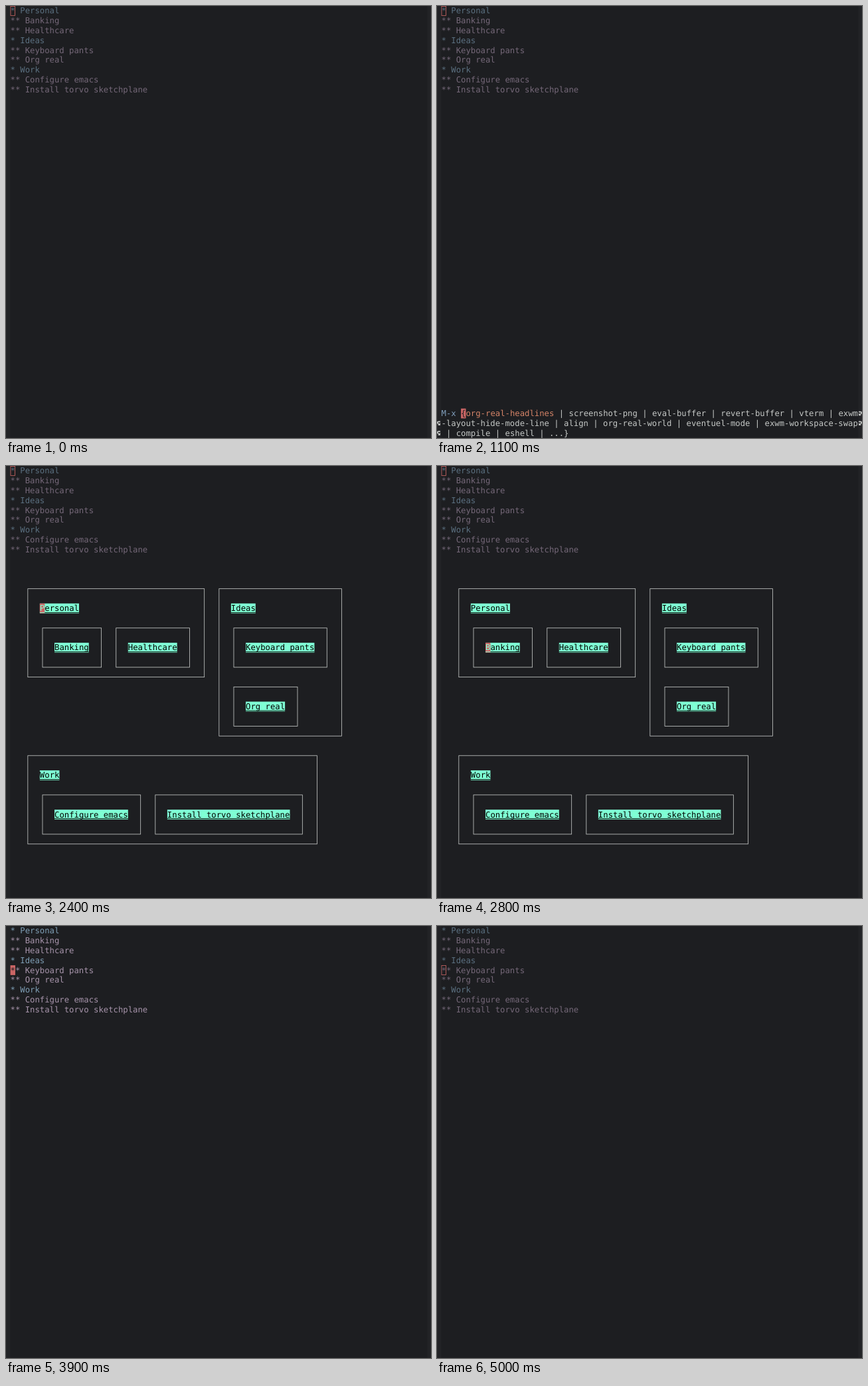
An HTML page for the animation above (5600 ms loop, 640 px wide and 650 px high).

```html
<!DOCTYPE html>
<html lang="en">
<head>
<meta charset="utf-8">
<title>Outline to boxes</title>
<style>
  html, body { margin: 0; width: 100%; height: 100%; overflow: hidden; background: #1d1e21; }
  svg { display: block; width: 100vw; height: 100vh; }
  text {
    font: 14.949px "DejaVu Sans Mono", monospace;
    text-rendering: geometricPrecision;
    white-space: pre;
    fill: #c5c8c6;
  }
  .fringe { fill: #222326; }
  .h1 { fill: #5b7080; }
  .h2 { fill: #756879; }
  .active .h1 { fill: #7f9fb6; }
  .active .h2 { fill: #a794ab; }
  .box { fill: none; stroke: #c5c8c6; }
  .label { fill: #7fffd4; }
  .ink { fill: #000; }
  .prompt { fill: #819fbd; }
  .pick { fill: #d58468; }
  .cursor { fill: #cc6666; }
  .hollow { fill: none; stroke: #cc6666; }
  .curl { fill: none; stroke: #c5c8c6; stroke-width: 2; }
  .tip { fill: #c5c8c6; }
</style>
</head>
<body>
<svg id="stage" viewBox="0 0 780 792" preserveAspectRatio="none"></svg>
<script>
const LOOP = 5600, CW = 9, RH = 18, LEFT = 8;
const BG = "#1d1e21", AQUA = "#7fffd4";
const stage = document.getElementById("stage");
const colX = c => LEFT + c * CW;

function add(parent, tag, attrs = {}, content = "") {
  const el = document.createElementNS("http://www.w3.org/2000/svg", tag);
  for (const key in attrs) el.setAttribute(key, attrs[key]);
  el.textContent = content;
  parent.appendChild(el);
  return el;
}

const rect = (parent, x, y, width, height, cls) =>
  add(parent, "rect", { x, y, width, height, class: cls });

const write = (parent, col, row, str, cls = "") =>
  add(parent, "text", { x: colX(col), y: row * RH + 14, class: cls }, str);

rect(stage, 0, 0, 780, 792, "").setAttribute("fill", BG);
rect(stage, 0, 0, 8, 792, "fringe");
rect(stage, 773, 0, 7, 792, "fringe");

// Outline
const outline = add(stage, "g");
[
  "* Personal", "** Banking", "** Healthcare",
  "* Ideas", "** Keyboard pants", "** Org real",
  "* Work", "** Configure emacs", "** Install torvo sketchplane"
].forEach((line, row) => write(outline, 0, row, line, line[1] === "*" ? "h2" : "h1"));

// Boxes: label, left column, right column, top row, bottom row
const boxes = add(stage, "g");
[
  ["Personal", 3, 39, 12, 21],
  ["Banking", 6, 18, 16, 20],
  ["Healthcare", 21, 36, 16, 20],
  ["Ideas", 42, 67, 12, 27],
  ["Keyboard pants", 45, 64, 16, 20],
  ["Org real", 45, 58, 22, 26],
  ["Work", 3, 62, 29, 38],
  ["Configure emacs", 6, 26, 33, 37],
  ["Install torvo sketchplane", 29, 59, 33, 37]
].forEach(([name, left, right, top, bottom]) => {
  rect(boxes, colX(left) + 5, top * RH + 9, (right - left) * CW, (bottom - top) * RH, "box");
  const x = colX(left + 3), y = (top + 2) * RH, w = name.length * CW;
  rect(boxes, x, y, w, RH, "label");
  write(boxes, left + 3, top + 2, name, "ink");
  rect(boxes, x, y + 16, w, 1, "ink");
});

// Minibuffer
const menu = add(stage, "g");
write(menu, 0, 41, "M-x", "prompt");
write(menu, 5, 41, "org-real-headlines", "pick");
write(menu, 24, 41, "| screenshot-png | eval-buffer | revert-buffer | vterm | exwm");
write(menu, 0, 42, "-layout-hide-mode-line | align | org-real-world | eventuel-mode | exwm-workspace-swap");
write(menu, 1, 43, "| compile | eshell | ...}");

function curl(row, atRight) {
  const place = atRight ? `translate(780 ${row * RH + 5}) scale(-1 1)` : `translate(0 ${row * RH + 5})`;
  const g = add(menu, "g", { transform: place });
  add(g, "path", { d: "M6 1H3.5Q1 1 1 3T3.5 5.5", class: "curl" });
  add(g, "path", { d: "M6 3V8H1.5Z", class: "tip" });
}
curl(41, true);
curl(42, true);
curl(42, false);
curl(43, false);

const message = write(stage, 0, 43, "Truncate long lines enabled");

// Cursors
const hollow = rect(stage, 0, 0, CW - 1, RH - 1, "hollow");
const solid = add(stage, "g");
rect(solid, 0, 0, CW, RH, "cursor");
const glyph = add(solid, "text", { x: 0, y: 14 });
const under = rect(solid, 0, 16, CW, 1, "label");

// at: start time; block: [col, row, char, on label]; ring: row of the hollow cursor
const steps = [
  { at: 0, ring: 0 },
  { at: 400, block: [0, 0, "*"], active: true },
  { at: 1000, ring: 0, block: [4, 41, "{"], menu: true },
  { at: 1400, ring: 0, block: [0, 11, ""], boxes: true, message: true },
  { at: 2400, ring: 0, block: [6, 14, "P", true], boxes: true },
  { at: 2800, ring: 0, block: [9, 18, "B", true], boxes: true },
  { at: 3100, ring: 0, block: [24, 18, "H", true], boxes: true },
  { at: 3400, ring: 0, block: [48, 18, "K", true], boxes: true },
  { at: 3900, block: [0, 4, "*"], active: true },
  { at: 4800, ring: 4 }
];

const show = (el, on) => { el.style.display = on ? "" : "none"; };
let current;

function render(step) {
  outline.setAttribute("class", step.active ? "active" : "");
  show(boxes, step.boxes);
  show(menu, step.menu);
  show(message, step.message);
  show(hollow, step.ring !== undefined);
  if (step.ring !== undefined) {
    hollow.setAttribute("x", LEFT + 0.5);
    hollow.setAttribute("y", step.ring * RH + 0.5);
  }
  show(solid, step.block);
  if (step.block) {
    const [col, row, char, onLabel] = step.block;
    solid.setAttribute("transform", `translate(${colX(col)} ${row * RH})`);
    glyph.textContent = char;
    glyph.style.fill = onLabel ? AQUA : BG;
    show(under, onLabel);
  }
}

function tick() {
  const t = performance.now() % LOOP;
  const step = steps.findLast(s => s.at <= t);
  if (step !== current) render(current = step);
  requestAnimationFrame(tick);
}
tick();
</script>
</body>
</html>
```
